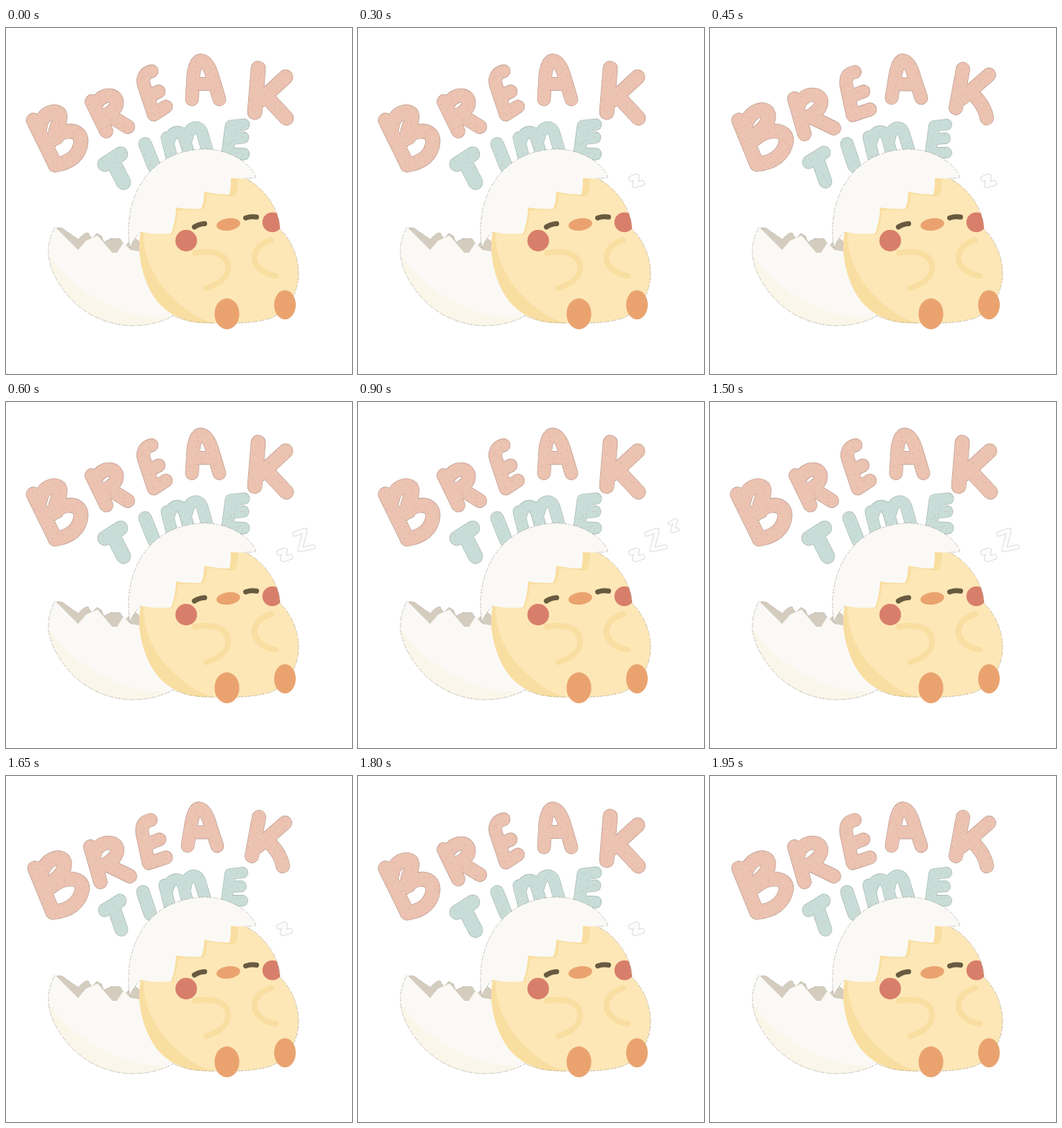
These frames come from a looping animation (480x480 px, 2100 ms). An HTML page with a canvas:

```html
<!DOCTYPE html>
<html lang="en">
<head>
<meta charset="utf-8">
<title>Break time</title>
<style>
html, body { margin: 0; width: 100%; height: 100%; overflow: hidden; background: #fff; }
canvas { display: block; width: 480px; height: 480px; }
</style>
</head>
<body>
<canvas id="stage" width="480" height="480"></canvas>
<script>
const ctx = document.getElementById('stage').getContext('2d');
const STEP = 150, LOOP = 2100;
const PINK = '#ecc2b0', MINT = '#c9ddd8';
const CREAM = '#faf9f6', YELLOW = '#fde7b7', SHADE = '#f9dea1', ORANGE = '#eaa36f', BLUSH = '#d87f6b';

// Each letter: stroke width, colour, path
const poses = [[
  [20, PINK, 'M38 128L68 189M47 138C49 116 73 111 75 122C75 134 66 140 70 152M64 155C80 138 104 140 104 157C103 176 89 187 68 190'],
  [19, PINK, 'M119 102L139 143M124 110C127 94 148 88 153 100C156 112 143 119 133 123M143 121L169 137'],
  [18, PINK, 'M202 60C193 62 189 69 191 78L205 120L222 109M198 95L212 88'],
  [18, PINK, 'M258 99L260 65C262 50 266 45 271 45C279 46 284 58 287 69L296 99M261 78L286 77'],
  [20, PINK, 'M350 56L345 117M388 68L353 100M361 95L389 125'],
  [20, MINT, 'M137 189L159 175M148 185L163 214'],
  [18, MINT, 'M193 161L205 191'],
  [16, MINT, 'M223 152L231 184M226 158C229 142 243 140 247 152L254 175M251 154C254 135 268 134 272 145L281 176'],
  [16, MINT, 'M330 134L312 136L307 174L330 175M311 154L329 152']
], [
  [20, PINK, 'M40 128L65 189M49 137C53 115 77 107 81 120C82 133 71 143 60 150M62 154C82 137 106 141 106 156C103 176 87 187 65 189'],
  [19, PINK, 'M117 98L131 147M123 108C127 92 149 87 154 100C156 113 142 121 130 126M141 124L172 139'],
  [18, PINK, 'M201 61C191 63 188 69 189 79L198 121L222 113M195 95L213 88'],
  [18, PINK, 'M252 97L257 66C260 51 263 45 268 45C276 46 281 58 284 70L293 97M256 78L283 78'],
  [19, PINK, 'M351 57L341 111M387 65L349 98M361 88C374 100 382 112 384 125'],
  [18, MINT, 'M137 186L158 173M149 181L160 213'],
  [18, MINT, 'M190 161L200 191'],
  [16, MINT, 'M220 151L228 184M224 158C227 141 241 139 246 152L252 175M249 155C251 135 265 134 269 146L278 176'],
  [15, MINT, 'M328 134L311 136L306 173L328 173M310 154L326 153']
]];

const naps = [
  { on: 300, off: 1950, w: 7, d: 'M379 209L387 206L384 218L394 215' },
  { on: 600, off: 1650, w: 6, d: 'M401 183L415 178L408 205L426 201' },
  { on: 900, off: 1350, w: 5, d: 'M433 168L441 164L436 179L443 177' }
];

function layer(draw) {
  const c = document.createElement('canvas');
  c.width = c.height = 480;
  draw(c.getContext('2d'));
  return c;
}

function line(g, d, w, color) {
  g.lineCap = g.lineJoin = 'round';
  g.lineWidth = w;
  g.strokeStyle = color;
  g.stroke(new Path2D(d));
}

function fill(g, d, color) {
  g.fillStyle = color;
  g.fill(new Path2D(d));
}

function oval(g, x, y, rx, ry, color, turn = 0) {
  g.fillStyle = color;
  g.beginPath();
  g.ellipse(x, y, rx, ry, turn, 0, 7);
  g.fill();
}

// Thin broken rim along a silhouette
function rim(g, d, alpha = 0.4) {
  g.save();
  g.setLineDash([2, 1, 1, 2, 3, 1]);
  g.lineCap = 'butt';
  g.lineWidth = 0.9;
  g.strokeStyle = `rgba(80,70,55,${alpha})`;
  g.stroke(new Path2D(d));
  g.restore();
}

function random(seed) {
  return () => (seed = (seed * 16807) % 2147483647) / 2147483647;
}

function lettering(g, pose, seed) {
  for (const [w, color, d] of pose) line(g, d, w + 0.8, color === PINK ? '#b39287' : '#9fb1ac');
  for (const [w, color, d] of pose) line(g, d, w - 0.4, color);
  // chalky grain
  const rnd = random(seed);
  g.globalCompositeOperation = 'source-atop';
  for (let i = 0; i < 5000; i++) {
    g.fillStyle = i % 2 ? 'rgba(150,100,75,.1)' : 'rgba(255,255,255,.14)';
    g.fillRect(25 + rnd() * 380, 30 + rnd() * 200, 1.3, 1.3);
  }
}

function chick(g) {
  // lower shell
  fill(g, 'M67 277L77 277L100 293L109 285L114 284L119 292L126 285L132 288L136 297L145 292L158 292L165 302L178 290L190 300L190 312L80 312Z', '#d4cdbf');
  rim(g, 'M72 277L77 277L100 293L109 285L114 284L119 292L126 285L132 288L136 297L145 292L158 292L165 302L178 290', 0.3);
  const bowl = 'M68 276L100 308L111 295L127 288L151 316L163 298L173 308L200 312L240 396C220 407 198 413 175 413C131 412 95 389 74 355C56 326 54 303 68 276Z';
  fill(g, bowl, CREAM);
  g.save();
  g.clip(new Path2D(bowl));
  fill(g, 'M55 306C74 343 106 367 150 388C175 398 200 402 235 404L235 420L50 420Z', '#faf6e9');
  g.restore();
  rim(g, 'M232 399C215 409 195 413 175 413C131 412 95 389 74 355C56 326 54 303 68 276');

  // body
  const body = 'M187 282C182 306 186 335 200 364C215 392 240 408 275 409C300 410 340 411 366 403C392 393 406 366 406 339C405 315 396 295 380 279C380 252 357 219 330 208L300 190L200 220Z';
  fill(g, body, YELLOW);
  g.save();
  g.clip(new Path2D(body));
  fill(g, 'M180 275L191 284C190 314 204 348 230 373C249 392 267 404 288 409L240 425L170 390Z', SHADE);
  fill(g, 'M311 205L322 210Q322 229 316 234L279 230Q278 249 273 252L239 253Q236 276 231 286L187 284L187 270Z', SHADE);
  oval(g, 369.5, 269.5, 13.8, 13.8, BLUSH);
  g.restore();
  rim(g, 'M330 208C357 219 380 252 380 279C396 295 405 315 406 339C406 366 392 393 366 403C340 411 300 410 275 409C255 408 242 404 232 399');

  line(g, 'M262 312C288 307 307 314 308 331C309 347 295 355 278 361', 8, SHADE);
  line(g, 'M368 294C350 300 343 311 345 322C348 334 360 341 374 344', 8, SHADE);

  // face
  oval(g, 250, 295, 15, 15, BLUSH);
  oval(g, 308.5, 272.5, 16.5, 8.5, ORANGE, -0.13);
  line(g, 'M261.5 276Q268 271.8 275.5 271.5', 7.2, '#675a3f');
  line(g, 'M332.5 263.5Q340 261 347.5 262.3', 7, '#675a3f');

  // feet
  oval(g, 306.5, 396.5, 17.2, 21.5, ORANGE);
  oval(g, 387, 384, 15, 20.3, ORANGE);

  // shell cap
  const cap = 'M172 305C167 277 171 244 186 218C204 186 238 168 277 168C310 169 338 186 347 207Q330 210 312 208Q312 222 310 231Q292 231 275 227Q275 240 271 250.5Q254 252 236 249Q235 270 229 285Q208 287 187 283Q178 291 172 305Z';
  fill(g, cap, CREAM);
  rim(g, 'M187 283Q178 291 172 305C167 277 171 244 186 218C204 186 238 168 277 168C310 169 338 186 347 207Q340 209 331 208');
}

const words = poses.map((p, i) => layer(g => lettering(g, p, 71 + i * 400)));
const figure = layer(chick);

function frame(now) {
  const t = now % LOOP;
  ctx.fillStyle = '#fff';
  ctx.fillRect(0, 0, 480, 480);
  ctx.drawImage(words[Math.floor(t / STEP) % 2], 0, 0);
  ctx.drawImage(figure, 0, 0);
  for (const z of naps) {
    if (t < z.on || t >= z.off) continue;
    line(ctx, z.d, z.w + 0.8, '#d2d2d2');
    line(ctx, z.d, z.w - 0.8, '#fdfdfd');
  }
}

const start = performance.now();
function tick() {
  frame(performance.now() - start);
  requestAnimationFrame(tick);
}
tick();
</script>
</body>
</html>
```
